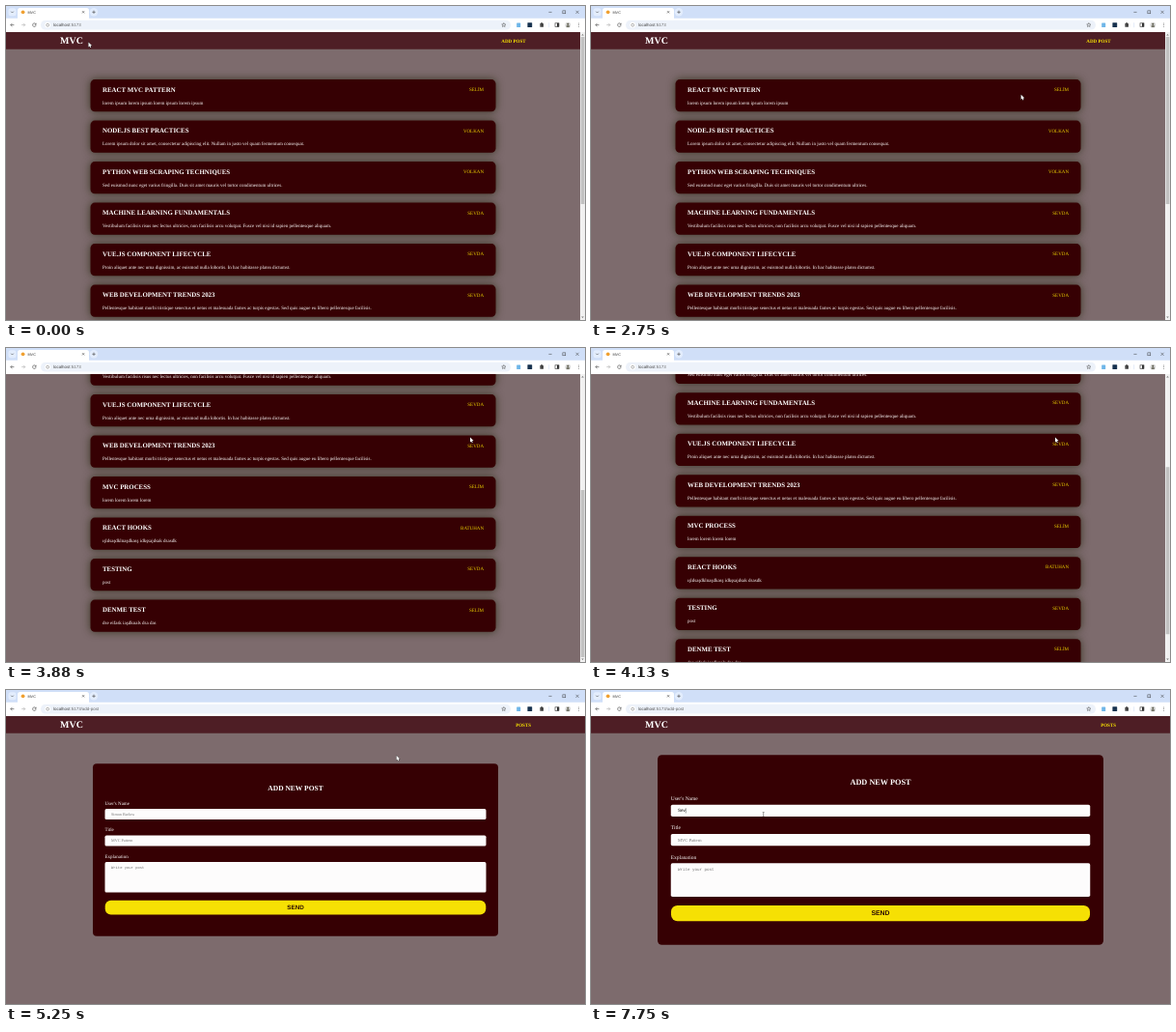
Write an HTML page with a canvas that moves like this. It is 600 px wide and 325 px high and loops after 8 s.

```html
<!DOCTYPE html>
<html lang="en">
<head>
<meta charset="utf-8">
<title>MVC</title>
<style>
html, body { margin: 0; width: 100%; height: 100%; overflow: hidden; background: #7d6b6d; }
canvas { display: block; width: 600px; height: 325px; }
</style>
</head>
<body>
<canvas id="stage"></canvas>
<script>
const canvas = document.getElementById('stage');
const ctx = canvas.getContext('2d');
const dpr = window.devicePixelRatio || 1;
canvas.width = 600 * dpr;
canvas.height = 325 * dpr;

const LOOP = 8000;
const PX = 0.3125; // stage units per page pixel
const SERIF = '"Liberation Serif", "Times New Roman", serif';
const SANS = '"Liberation Sans", Arial, sans-serif';
const MONO = '"Liberation Mono", monospace';
const YELLOW = '#f8e300';
const MAROON = '#360003';
const MAX_SCROLL = 198;

const T = { down: 3320, downEnd: 3860, up: 3960, upEnd: 4420, nav: 4870, hover: 5250, focus: 6000 };

const posts = [
  ['REACT MVC PATTERN', 'SELİM', 'lorem ipsum lorem ipsum lorem ipsum lorem ipsum'],
  ['NODE.JS BEST PRACTICES', 'VOLKAN', 'Lorem ipsum dolor sit amet, consectetur adipiscing elit. Nullam in justo vel quam fermentum consequat.'],
  ['PYTHON WEB SCRAPING TECHNIQUES', 'VOLKAN', 'Sed euismod nunc eget varius fringilla. Duis sit amet mauris vel tortor condimentum ultrices.'],
  ['MACHINE LEARNING FUNDAMENTALS', 'SEVDA', 'Vestibulum facilisis risus nec lectus ultricies, non facilisis arcu volutpat. Fusce vel nisi id sapien pellentesque aliquam.'],
  ['VUE.JS COMPONENT LIFECYCLE', 'SEVDA', 'Proin aliquet ante nec urna dignissim, ac euismod nulla lobortis. In hac habitasse platea dictumst.'],
  ['WEB DEVELOPMENT TRENDS 2023', 'SEVDA', 'Pellentesque habitant morbi tristique senectus et netus et malesuada fames ac turpis egestas. Sed quis augue eu libero pellentesque facilisis.'],
  ['MVC PROCESS', 'SELİM', 'lorem lorem lorem lorem'],
  ['REACT HOOKS', 'BATUHAN', 'ışldsaşdklnaşdkasş idkşsajdsak dsasdk'],
  ['TESTING', 'SEVDA', 'post'],
  ['DENME TEST', 'SELİM', 'dse eifask iaşdkoals dsa das']
];

// time, x, y of the pointer tip
const path = [
  [0, 85.5, 37.5], [200, 85.5, 37.5], [1130, 80.5, 84.5], [1640, 80.5, 84.5],
  [3000, 481, 92.5], [4150, 481, 92.5], [4650, 525, 36], [4850, 525, 36],
  [5000, 517, 37.5], [5650, 178.7, 128.8], [LOOP, 178.7, 128.8]
];

const clamp = v => Math.max(0, Math.min(1, v));
const progress = (t, a, b) => clamp((t - a) / (b - a));
const smooth = p => p * p * (3 - 2 * p);
const cubic = p => p < 0.5 ? 4 * p ** 3 : 1 - (2 - 2 * p) ** 3 / 2;

function rect(x, y, w, h, color, r = 0) {
  ctx.fillStyle = color;
  ctx.beginPath();
  ctx.roundRect(x, y, w, h, r);
  ctx.fill();
}

function disc(x, y, r, color) {
  ctx.fillStyle = color;
  ctx.beginPath();
  ctx.arc(x, y, r, 0, Math.PI * 2);
  ctx.fill();
}

function line(points, color = '#444', width = 0.6) {
  ctx.strokeStyle = color;
  ctx.lineWidth = width;
  ctx.beginPath();
  points.forEach(([x, y], i) => i ? ctx.lineTo(x, y) : ctx.moveTo(x, y));
  ctx.stroke();
}

function shape(points, color) {
  ctx.fillStyle = color;
  ctx.beginPath();
  points.forEach(([x, y]) => ctx.lineTo(x, y));
  ctx.fill();
}

// size is in page pixels; returns the drawn width in stage units
function text(str, x, y, size, color, { font = SERIF, bold = false, align = 'left' } = {}) {
  ctx.save();
  ctx.translate(x, y);
  ctx.scale(PX, PX);
  ctx.font = `${bold ? 'bold ' : ''}${size}px ${font}`;
  ctx.textRendering = 'geometricPrecision';
  ctx.textAlign = align;
  ctx.fillStyle = color;
  ctx.fillText(str, 0, 0);
  const width = ctx.measureText(str).width * PX;
  ctx.restore();
  return width;
}

function browser(url) {
  rect(0, 0, 600, 14, '#d0dff8');
  rect(2.5, 2.2, 8, 8, '#e3edfd', 2.5);
  line([[5.2, 5.7], [6.5, 7], [7.8, 5.7]]);
  rect(12, 2, 74, 13, '#fff', 2.5);
  disc(17.6, 6.3, 1.9, '#f0a030');
  text('MVC', 22.5, 7.8, 12, '#333', { font: SANS });
  line([[79, 5.2], [81.2, 7.4]]);
  line([[81.2, 5.2], [79, 7.4]]);
  disc(91, 6.3, 4.2, '#e3edfd');
  line([[89.3, 6.3], [92.7, 6.3]]);
  line([[91, 4.6], [91, 8]]);
  line([[562.4, 6.4], [565.6, 6.4]], '#333', 0.5);
  ctx.strokeRect(576.9, 4.9, 2.9, 2.9);
  line([[590.5, 4.8], [593.6, 7.9]], '#333', 0.5);
  line([[593.6, 4.8], [590.5, 7.9]], '#333', 0.5);

  rect(0, 12.7, 600, 14.3, '#fff');
  line([[8.4, 19.6], [4.8, 19.6]]);
  line([[6.5, 17.9], [4.8, 19.6], [6.5, 21.3]]);
  line([[16.2, 19.6], [19.8, 19.6]], '#aaa');
  line([[18.1, 17.9], [19.8, 19.6], [18.1, 21.3]], '#aaa');
  ctx.strokeStyle = '#444';
  ctx.beginPath();
  ctx.arc(29.4, 19.6, 1.8, 0.3, 5.5);
  ctx.stroke();
  shape([[31.4, 17.4], [31.4, 19.4], [29.6, 19.4]], '#444');

  rect(36, 14.8, 487, 9.8, '#edf2fa', 4.9);
  disc(43.2, 19.7, 2.9, '#fff');
  ctx.strokeStyle = '#555';
  ctx.lineWidth = 0.45;
  ctx.beginPath();
  ctx.arc(43.2, 19.7, 1.4, 0, 7);
  ctx.stroke();
  const w = text('localhost', 49, 21.2, 14.2, '#444', { font: SANS });
  text(url, 49 + w, 21.2, 14.2, '#666', { font: SANS });

  const star = Array.from({ length: 11 }, (_, i) => {
    const a = i * Math.PI / 5 - Math.PI / 2, r = i % 2 ? 1 : 2.2;
    return [515.8 + r * Math.cos(a), 19.7 + r * Math.sin(a)];
  });
  line(star, '#444', 0.5);
  rect(529.2, 17.4, 4, 4.6, '#6fb6e8', 0.5);
  rect(540.4, 17.3, 4.8, 4.8, '#17324f', 0.5);
  rect(553.4, 18.1, 3.6, 3.6, '#444', 0.5);
  disc(555.1, 17.9, 0.9, '#444');
  line([[562.7, 17.2], [562.7, 22.2]], '#c6d6f2', 0.5);
  ctx.strokeStyle = '#333';
  ctx.lineWidth = 0.6;
  ctx.strokeRect(569, 17.8, 4, 3.6);
  rect(571, 17.8, 2, 3.6, '#333');
  disc(582.3, 19.7, 2.9, '#d9d9d9');
  disc(582.3, 18.8, 1, '#554');
  rect(580.6, 20.2, 3.4, 1.6, '#554', 0.8);
  for (const y of [18, 19.7, 21.4]) disc(593.7, y, 0.45, '#333');
}

function header(link, right, width) {
  rect(0, 27, width, 17.8, '#4e1e25');
  text('MVC', 56, 39.4, 32, '#fff', { bold: true });
  text(link, right, 37.8, 16, YELLOW, { bold: true, align: 'right' });
}

function card([title, name, body], y) {
  ctx.save();
  ctx.shadowColor = 'rgba(35, 35, 10, 0.75)';
  ctx.shadowBlur = 8 * dpr;
  rect(87.5, y, 420, 33.2, MAROON, 4.5);
  ctx.restore();
  text(title, 100, y + 12.7, 22, '#fff', { bold: true });
  text(name, 495, y + 12, 16, '#eed300', { align: 'right' });
  text(body, 100, y + 25.7, 16, '#fff');
}

function scrollbar(scroll) {
  rect(595, 27, 5, 298, '#f1f1f1');
  rect(595.7, 32 + scroll * 115 / MAX_SCROLL, 3.7, 173, '#c1c1c1');
  shape([[596.2, 30.4], [597.5, 28.9], [598.8, 30.4]], '#777');
  shape([[596.2, 321.6], [597.5, 323.1], [598.8, 321.6]], '#777');
}

function listPage(t) {
  const scroll = MAX_SCROLL * (cubic(progress(t, T.down, T.downEnd)) - cubic(progress(t, T.up, T.upEnd)));
  ctx.save();
  ctx.translate(0, -scroll);
  header('ADD POST', 538.5, 595);
  posts.forEach((post, i) => card(post, 76.1 + 42.5 * i));
  ctx.restore();
  scrollbar(scroll);
}

function field(label, y, h, hint, opts) {
  text(label, 102.5, y - 4.4, 16, '#fff');
  rect(102.5, y, 395, h, '#fdfcfc', 1.6);
  if (hint) text(hint, 109, y + 6.9, opts ? 12.2 : 13.33, '#757575', opts);
}

function typed(t) {
  const count = (t >= 7250) + (t >= 7500) + (t >= 7750);
  return 'Sev'.slice(0, count);
}

function formPage(t) {
  header('POSTS', 544, 600);
  const zoom = 1 + 0.1 * smooth(progress(t, T.hover, T.hover + 300));
  const value = typed(t);
  ctx.save();
  ctx.translate(300, 165.5);
  ctx.scale(zoom, zoom);
  ctx.translate(-300, -165.5);
  rect(90, 76.2, 420, 178.6, MAROON, 4);
  text('ADD NEW POST', 300, 104.5, 24, '#fff', { bold: true, align: 'center' });
  field("User's Name", 123.1, 11, value ? '' : 'Simon Barlow');
  field('Title', 150.6, 11, 'MVC Pattern');
  field('Explanation', 178.1, 31.4, 'Write your post', { font: MONO });
  rect(102.7, 217.7, 394.6, 14.8, '#f6e004', 6);
  text('SEND', 300, 227.3, 20, '#2a0a04', { font: SANS, bold: true, align: 'center' });
  const w = value ? text(value, 109, 130, 13.33, '#111', { font: SERIF && SANS }) : 0;
  const caretOn = t >= T.focus && (t < 6500 || t >= 7000);
  if (caretOn) rect(109.1 + w, 126.1, 0.35, 4.9, '#000');
  ctx.restore();
}

function pointer(t) {
  const i = path.findIndex(k => k[0] > t);
  const [t0, x0, y0] = path[i - 1], [t1, x1, y1] = path[i];
  const p = smooth(progress(t, t0, t1));
  const x = x0 + (x1 - x0) * p, y = y0 + (y1 - y0) * p;
  ctx.save();
  ctx.translate(x, y);
  if (t >= 5600) {
    line([[0, -2.2], [0, 2.2]], '#333', 0.5);
    line([[-1, -2.3], [1, -2.3]], '#333', 0.4);
    line([[-1, 2.3], [1, 2.3]], '#333', 0.4);
  } else {
    const arrow = [[0, 0], [0, 4.9], [1.1, 3.9], [1.9, 5.6], [2.7, 5.2], [2, 3.6], [3.5, 3.5], [0, 0]];
    line(arrow, '#222', 0.6);
    shape(arrow, '#fff');
  }
  ctx.restore();
}

function draw(t) {
  const onForm = t >= T.nav;
  ctx.setTransform(dpr, 0, 0, dpr, 0, 0);
  rect(0, 0, 600, 325, '#7d6b6d');
  (onForm ? formPage : listPage)(t);
  browser(onForm ? ':5173/add-post' : ':5173');
  pointer(t);
}

const start = performance.now();
function tick() {
  draw((performance.now() - start) % LOOP);
  requestAnimationFrame(tick);
}
tick();
</script>
</body>
</html>
```
